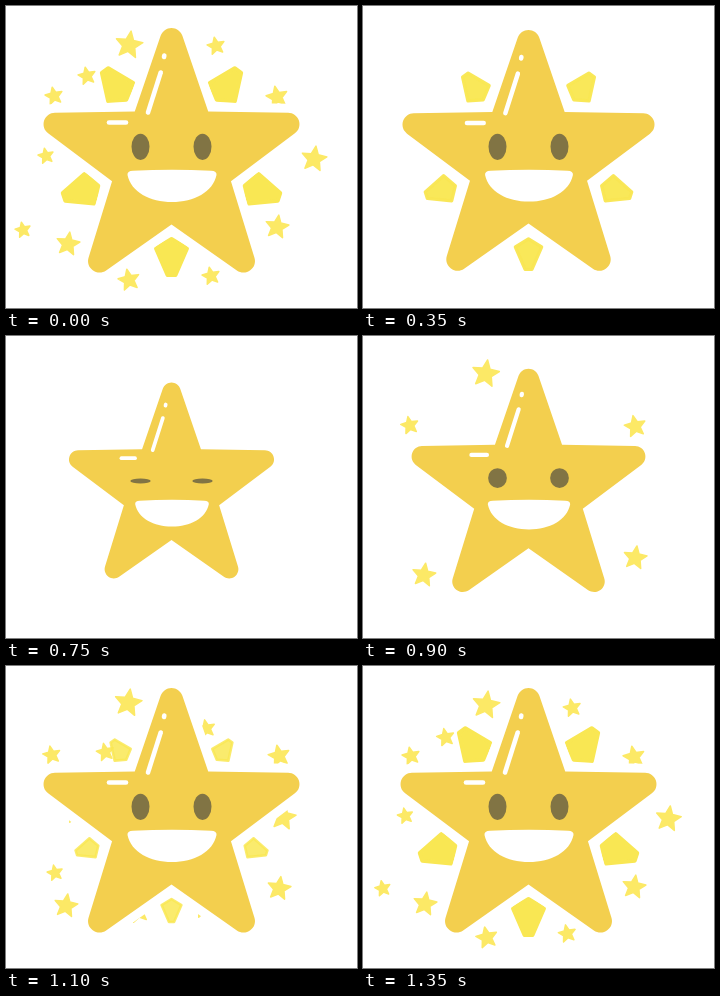
These frames come from a looping animation (351x302 px, 1.4 s). An HTML page with a canvas:

```html
<!DOCTYPE html>
<html lang="en">
<head>
<meta charset="utf-8">
<title>Twinkling star</title>
<style>
  html, body { margin: 0; width: 100%; height: 100%; overflow: hidden; background: #fff; }
  canvas { display: block; }
</style>
</head>
<body>
<canvas id="stage" width="351" height="302"></canvas>
<script>
const ctx = document.getElementById('stage').getContext('2d');
const LOOP = 1400, STEP = 50;
const CX = 165.5, CY = 145;   // point the star scales about
const HUB = 11;               // the five-fold centre lies this far below it
const GOLD = '#f3cf4e', LEMON = '#f9e753', PALE = '#fce966', OLIVE = '#817444';

// Resting place and radius of the small stars
const poppers = [[123, 39, 14], [48, 90, 9], [271, 91, 11], [62, 238, 12], [271, 221, 12]];
const flyers = [
  [210, 40, 9], [81, 70, 9], [40, 150, 8], [308, 153, 13],
  [17, 224, 8], [123, 274, 11], [205, 270, 9]
];

const clamp = v => Math.max(0, Math.min(1, v));
const ramp = (t, a, b) => clamp((t - a) / (b - a));
const smooth = p => p * p * (3 - 2 * p);

// Corners of a five-pointed star, starting at the top tip
function starPoints(outer, inner) {
  return Array.from({ length: 10 }, (_, i) => {
    const a = i * Math.PI / 5, r = i % 2 ? inner : outer;
    return [r * Math.sin(a), -r * Math.cos(a)];
  });
}

function roundedStar(outer, inner, tipRadius) {
  const path = new Path2D(), points = starPoints(outer, inner);
  path.moveTo(...points[9]);
  for (let i = 0; i < 10; i += 2) {
    path.arcTo(...points[i], ...points[i + 1], tipRadius);
    path.lineTo(...points[i + 1]);
  }
  path.closePath();
  return path;
}
const body = roundedStar(158, 62.5, 11.5);

function fillRounded(points, color, border) {
  ctx.fillStyle = ctx.strokeStyle = color;
  ctx.lineWidth = border;
  ctx.lineJoin = 'round';
  ctx.beginPath();
  points.forEach(p => ctx.lineTo(...p));
  ctx.closePath();
  ctx.fill();
  ctx.stroke();
}

// reach 1 is the resting place, smaller values lie nearer the middle
function smallStar([x, y, r], reach, size) {
  if (size <= 0) return;
  ctx.save();
  ctx.translate(CX + (x - CX) * reach, CY + (y - CY) * reach);
  ctx.rotate(r > 11 ? 0.15 : -0.2);
  ctx.scale(size, size);
  fillRounded(starPoints(r, r * 0.46), PALE, 1.5);
  ctx.restore();
}

function drawSmallStars(t) {
  const ending = t < 600;
  ctx.globalAlpha = ending ? 1 - ramp(t, 75, 300) : 1;
  const bump = 0.02 * Math.sin(Math.PI * ramp(t, 800, 1330));
  const pop = ending ? 1 : smooth(ramp(t, 760, 890));
  for (const star of poppers) smallStar(star, 1 + bump, pop);

  const age = ending ? t + LOOP : t;
  const reach = 1.007 - 0.4 * smooth(1 - ramp(age, 800, 1450));
  if (age > 900) for (const star of flyers) smallStar(star, reach, 1);
  ctx.globalAlpha = 1;
}

function drawRays(t) {
  const size = t < 600
    ? 1 - smooth(ramp(t, 300, 500))
    : 1 - (1 - ramp(t, 1000, 1250)) ** 2;
  if (size <= 0) return;
  const kite = [[0, 0], [15.5, 9.5], [4, 36], [-4, 36], [-15.5, 9.5]];
  ctx.globalAlpha = Math.min(1, 0.5 + size * 0.55);
  for (let i = 0; i < 5; i++) {
    ctx.save();
    ctx.translate(CX, CY + HUB);
    ctx.rotate(i * Math.PI * 0.4);
    ctx.translate(0, 77);
    ctx.scale(size, size);
    fillRounded(kite, LEMON, 4);
    ctx.restore();
  }
  ctx.globalAlpha = 1;
}

function shine(x1, y1, x2, y2) {
  ctx.beginPath();
  ctx.moveTo(x1, y1);
  ctx.lineTo(x2, y2);
  ctx.stroke();
}

function drawBody(scale) {
  ctx.save();
  ctx.translate(CX, CY);
  ctx.scale(scale, scale);
  ctx.lineJoin = ctx.lineCap = 'round';
  ctx.strokeStyle = '#fff';
  ctx.save();
  ctx.translate(0, HUB);
  ctx.lineWidth = 18;   // white rim that hides what lies behind
  ctx.stroke(body);
  ctx.fillStyle = GOLD;
  ctx.fill(body);
  ctx.restore();
  ctx.lineWidth = 4.6;
  shine(-7.2, -95.5, -7.5, -94);
  shine(-10.8, -78.5, -23.5, -38.5);
  shine(-62.5, -28.5, -45.5, -28.5);
  ctx.restore();
}

function drawFace(scale, open) {
  const lid = smooth(clamp(open * 1.1));
  ctx.fillStyle = OLIVE;
  for (const side of [-31, 31]) {
    ctx.beginPath();
    ctx.ellipse(CX + side, CY - 4.2 * lid, 10.2 - 1.2 * lid, 2.5 + 10.6 * lid, 0, 0, Math.PI * 2);
    ctx.fill();
  }
  const grin = 1 - (1 - scale) * 0.87;
  ctx.save();
  ctx.translate(166, 164);
  ctx.scale(grin, grin);
  ctx.fillStyle = '#fff';
  ctx.beginPath();
  ctx.moveTo(0, 32);
  for (const side of [1, -1]) {
    if (side < 0) ctx.lineTo(-39, 0.8);
    if (side > 0) {
      ctx.bezierCurveTo(22, 32, 41, 22, 44.5, 5);
      ctx.quadraticCurveTo(45, 1, 39, 0.8);
      ctx.quadraticCurveTo(0, -1.2, -39, 0.8);
    } else {
      ctx.quadraticCurveTo(-45, 1, -44.5, 5);
      ctx.bezierCurveTo(-41, 22, -22, 32, 0, 32);
    }
  }
  ctx.fill();
  ctx.restore();
}

function draw(t) {
  ctx.fillStyle = '#fff';
  ctx.fillRect(0, 0, 351, 302);
  const open = t < 650 ? 1 - smooth(ramp(t, 300, 600)) : smooth(ramp(t, 715, 1050));
  const scale = 0.795 + 0.205 * open;
  drawSmallStars(t);
  drawRays(t);
  drawBody(scale);
  drawFace(scale, open);
}

const start = performance.now();
function tick() {
  const t = (performance.now() - start) % LOOP;
  draw(Math.floor(t / STEP) * STEP);
  requestAnimationFrame(tick);
}
tick();
</script>
</body>
</html>
```
